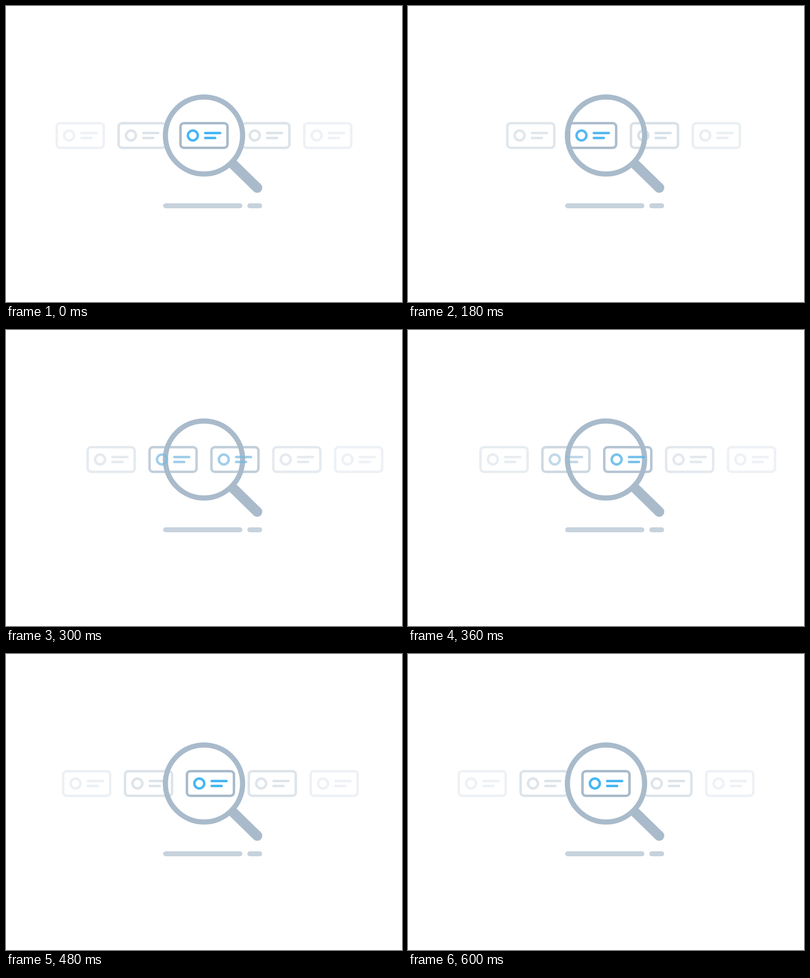
An HTML page with a canvas for the animation above (1.2 s loop, 800 by 600 pixels).

```html
<!DOCTYPE html>
<html lang="en">
<head>
<meta charset="utf-8">
<title>Card search</title>
<style>
  html, body { margin: 0; width: 100%; height: 100%; overflow: hidden; background: #fff; }
  canvas { display: block; width: 800px; height: 600px; }
</style>
</head>
<body>
<canvas id="stage" width="800" height="600"></canvas>
<script>
const ctx = document.getElementById('stage').getContext('2d');
const LOOP = 1200, MOVE = 600, STEP = 30, GAP = 125;
const CX = 400, CY = 262.5;
const SLATE = [169, 187, 203], BLUE = [70, 182, 243];
const NEAR = 0.4, FAR = 0.2;

const ramp = (t, a, b) => Math.min(1, Math.max(0, (t - a) / (b - a)));
const ease = p => p * p * (3 - 2 * p);
const mix = (a, b, p) => a + (b - a) * p;
const rgb = c => `rgb(${c.map(Math.round).join(',')})`;

function line(x1, y1, x2, y2, width, color, cap = 'round') {
  ctx.lineCap = cap;
  ctx.lineWidth = width;
  ctx.strokeStyle = color;
  ctx.beginPath();
  ctx.moveTo(x1, y1);
  ctx.lineTo(x2, y2);
  ctx.stroke();
}

function ring(x, y, r, width, color) {
  ctx.lineWidth = width;
  ctx.strokeStyle = color;
  ctx.beginPath();
  ctx.arc(x, y, r, 0, Math.PI * 2);
  ctx.stroke();
}

function drawGlass() {
  const color = rgb(SLATE);
  const endX = 507.5, endY = 368.5;
  ring(CX, CY, 78, 10.5, color);
  line(455.2, 317.2, endX, endY, 20.5, color, 'butt');
  ctx.fillStyle = color;
  ctx.beginPath();
  ctx.arc(endX, endY, 10.25, 0, Math.PI * 2);
  ctx.fill();
  line(322.5, 405, 472.5, 405, 10, '#c6d2dd');
  line(492.5, 405, 512.5, 405, 10, '#c6d2dd');
}

// focus: 0 = slate content, 1 = blue content
function drawCard(x, alpha, focus) {
  if (alpha <= 0) return;
  const content = rgb(SLATE.map((v, i) => mix(v, BLUE[i], focus)));
  ctx.save();
  ctx.globalAlpha = alpha;
  ctx.translate(x, CY);
  ctx.lineWidth = 5;
  ctx.strokeStyle = rgb(SLATE);
  ctx.beginPath();
  ctx.roundRect(-47.5, -25, 95, 50, 7);
  ctx.stroke();
  ring(-22.5, 0, 10, 5, content);
  line(2.5, -5, 32.5, -5, 5, content);
  line(2.5, 5, 22.5, 5, 5, content);
  ctx.restore();
}

function draw(t) {
  const slide = ease(ramp(t, 0, MOVE));
  const swap = ease(ramp(t, 120, 480));
  const cards = [
    [FAR * (1 - ramp(t, 0, 60)), 0],
    [mix(NEAR, FAR, slide), 0],
    [mix(1, NEAR, swap), 1 - swap],
    [mix(NEAR, 1, swap), swap],
    [mix(FAR, NEAR, slide), 0],
    [FAR * ramp(t, 180, 260), 0]
  ];
  ctx.clearRect(0, 0, 800, 600);
  drawGlass();
  cards.forEach(([alpha, focus], i) => drawCard(CX + GAP * (i - 2 - slide), alpha, focus));
}

const start = performance.now();
function tick() {
  const t = (performance.now() - start) % LOOP;
  draw(Math.floor((t + 1) / STEP) * STEP);
  requestAnimationFrame(tick);
}
tick();
</script>
</body>
</html>
```
